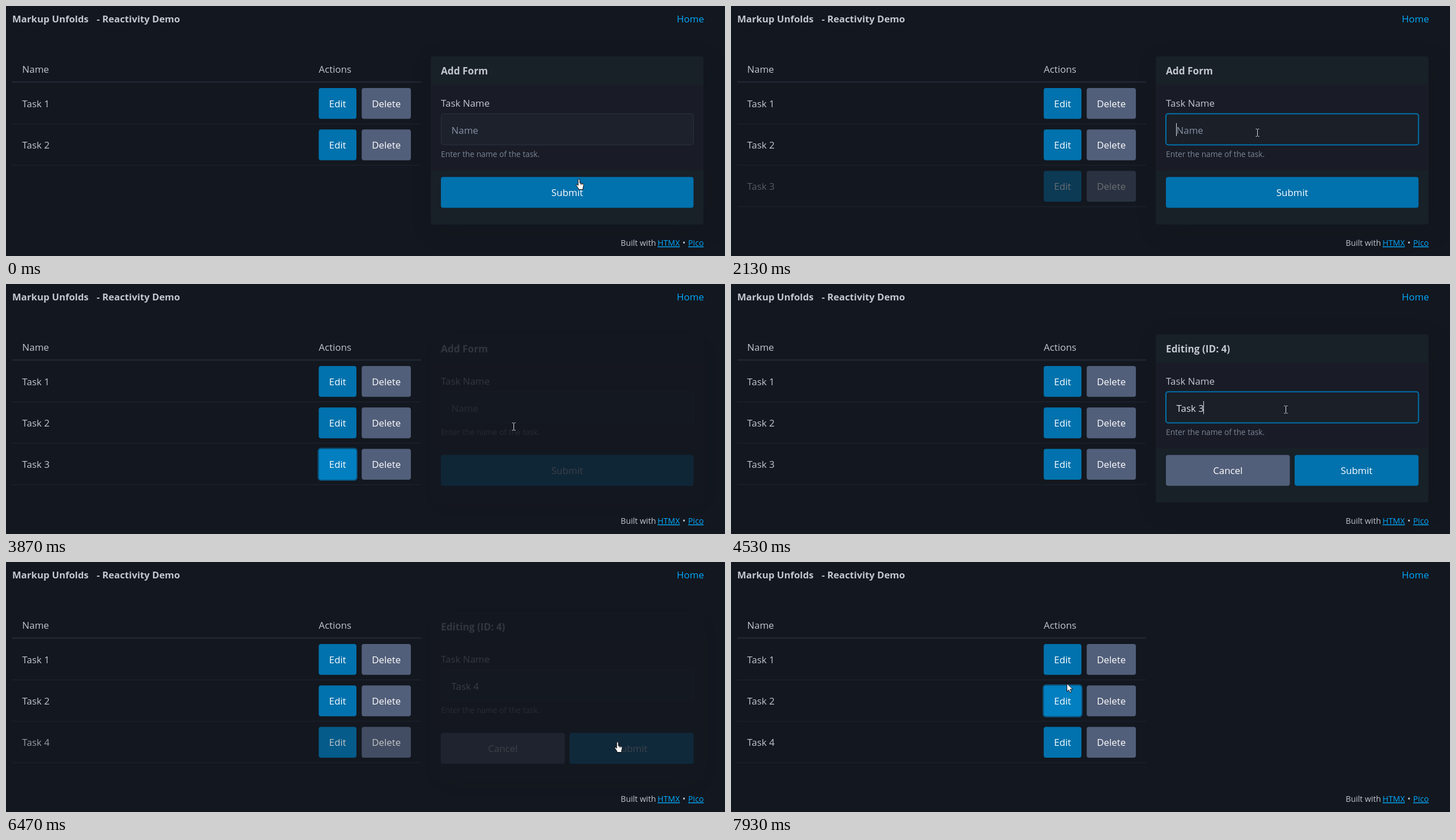
An HTML page for the animation above (8000 ms loop, 1268 by 442 pixels).

```html
<!DOCTYPE html>
<html lang="en">
<head>
<meta charset="utf-8">
<title>Reactivity Demo</title>
<style>
  html, body { margin: 0; width: 100%; height: 100%; overflow: hidden; background: #13171f; }
  svg { display: block; font: 500 16.9px "Open Sans", "Noto Sans", sans-serif; }
  text { fill: #c2c7d0; white-space: pre; }
  .bold { font-weight: 700; font-size: 17.2px; }
  .title { font-weight: 700; font-size: 16.8px; }
  .small { font-weight: 400; font-size: 14.2px; }
  .hint { font-weight: 400; font-size: 13.8px; fill: #7b8495; }
  .link { fill: #01aaff; }
  .line { text-decoration: underline; text-underline-offset: 2px; text-decoration-thickness: 1px; }
  .label { fill: #fff; text-anchor: middle; }
  .value { fill: #e0e3e7; }
  .empty { fill: #8891a4; }
  .shadow { filter: drop-shadow(6px 10px 20px rgba(7, 9, 12, .1)); }
</style>
</head>
<body>
<svg id="stage" width="1268" height="442" viewBox="0 0 1268 442"></svg>
<script>
const LOOP = 8000, FADE = 500;
const BLUE = '#0172ad', BRIGHT = '#017fc0', GREY = '#525f7a';
const stage = document.getElementById('stage');
const pen = document.createElement('canvas').getContext('2d');
pen.font = '500 16.9px "Open Sans", "Noto Sans", sans-serif';

const clamp = v => Math.max(0, Math.min(1, v));
const within = (t, ...spans) => spans.some(([a, b]) => t >= a && t < b);

const text = (x, y, s, cls = '') => `<text x="${x}" y="${y}" class="${cls}">${s}</text>`;
const rect = (x, y, w, h, fill, extra = '') =>
  `<rect x="${x}" y="${y}" width="${w}" height="${h}" fill="${fill}" ${extra}/>`;
const group = (opacity, body) => `<g opacity="${opacity}">${body}</g>`;

function button(x, y, w, s, fill, ring) {
  return (ring ? rect(x - 1, y - 1, w + 2, 56.5, 'none', 'rx="5" stroke="#0c4e75" stroke-width="2"') : '') +
    rect(x, y, w, 54.5, fill, 'rx="4"') + text(x + w / 2, y + 33.5, s, 'label');
}

// Contents of the name field over time
const typed = [
  [0, ''], [870, 'T'], [1200, 'Ta'], [1300, 'Tas'], [1400, 'Task'], [1600, 'Task '], [1730, 'Task 3'],
  [1945, ''], [3955, 'Task 3'], [5070, 'Task '], [5200, 'Task 4'], [6560, '']
];

function row(i, name, t) {
  const y = 145 + 73.2 * i;
  const focused = i === 2 && within(t, [3445, 4430]) || i === 1 && t >= 7430;
  const hot = focused || i === 1 && t >= 7290;
  return text(28.5, y + 33.5, name) +
    button(551.5, y, 66.5, 'Edit', hot ? BRIGHT : BLUE, focused) +
    button(627.3, y, 86.7, 'Delete', GREY);
}

function table(t) {
  const count = t < 1945 ? 2 : 3;
  const names = ['Task 1', 'Task 2', t < 6095 ? 'Task 3' : 'Task 4'];
  const shown = clamp((t - (t < 6095 ? 1945 : 6095)) / FADE);
  let out = text(28.5, 118, 'Name') + text(551.5, 118, 'Actions') + rect(11, 133, 721, 2.7, '#202632');
  for (let i = 0; i < count; i++) {
    out += rect(11, 208 + 73.2 * i, 721, 1, '#202632') + group(i === 2 ? shown : 1, row(i, names[i], t));
  }
  return out;
}

function field(t) {
  const value = typed.filter(([start]) => start <= t).pop()[1];
  const focus = within(t, [470, 3445], [4430, 6045]);
  const caret = within(t, [470, 1000], [1200, 2270], [2770, 3270], [4430, 4930], [5000, 5600]);
  const box = focus
    ? rect(767, 190.5, 445.5, 55, '#1a1f28', `rx="4" stroke="${BLUE}" stroke-width="2"`)
    : rect(767.5, 190.5, 445, 55, '#1c212c', 'rx="4" stroke="#2a3140"');
  return box + text(785.5, 225.5, value || 'Name', value ? 'value' : 'empty') +
    (caret ? rect(Math.round(785 + pen.measureText(value).width), 207, 1, 23, '#e0e3e7') : '');
}

function form(t) {
  const editing = within(t, [3955, 6560]);
  const opacity = Math.max(0, Math.min(1,
    Math.abs(t - 3955) / FADE, Math.abs(t - 6560) / FADE, (7930 - t) / FADE));
  const submit = within(t, [5930, 6560]) ? BRIGHT : BLUE;
  return group(opacity,
    rect(749, 89, 481, 297.5, '#182028', 'rx="4" class="shadow"') +
    rect(749, 139, 481, 152, '#191c26') +
    text(767, 120.5, editing ? 'Editing (ID: 4)' : 'Add Form', 'bold') +
    text(767, 177.5, 'Task Name') + field(t) +
    text(767, 266.5, 'Enter the name of the task.', 'hint') +
    (editing
      ? button(767, 302.3, 218.5, 'Cancel', GREY) + button(994, 302.3, 218.5, 'Submit', submit)
      : button(767, 302.3, 445.5, 'Submit', submit)));
}

// Pointer stops: time, x, y
const path = [
  [0, 1009, 306], [70, 1009, 306], [500, 903, 219], [1800, 903, 219], [2100, 928, 224], [2470, 928, 224],
  [2930, 567, 315], [3040, 567, 315], [3070, 568, 315], [3520, 568, 315], [3870, 895, 252],
  [4150, 978, 222], [5600, 978, 222], [5670, 1008, 243], [5950, 1077, 318], [6600, 1077, 318],
  [7300, 592, 247], [7470, 592, 247], [7900, 592, 215], [8000, 592, 215]
];
const shapes = {
  arrow: '<path d="M0 0v14l3.2-3 2.2 5 2.4-1-2.2-5h4.6z" fill="#fff" stroke="#000" stroke-width=".9"/>',
  beam: '<path d="M-3-6.5h2l1 1 1-1h2M0-5.5v11M-3 6.5h2l1-1 1 1h2" fill="none" stroke="#dde0e4"/>',
  hand: '<path d="M-.5 1q1.5-2 3 0v6l5.5 1.3q1.5.5 1.3 2.2l-1.3 6v2h-8v-2l-4-5.5q-.3-2 2-1.2l1.5 1.5z" ' +
    'fill="#fff" stroke="#000"/><path d="M4.3 7.5v3M6.5 8v2.7" stroke="#000" stroke-width=".8"/>'
};

function pointerKind(x, y) {
  const inside = (l, top, r, b) => x >= l && x <= r && y >= top && y <= b;
  if (inside(767, 190, 1213, 246) || inside(767, 246, 942, 272)) return 'beam';
  const onRow = y >= 145 && (y - 145) % 73.2 < 55 && y < 347;
  if (onRow && (inside(551, 0, 618, 442) || inside(627, 0, 714, 442)) || inside(767, 302, 1213, 357)) return 'hand';
  return 'arrow';
}

function pointer(t) {
  if (within(t, [870, 1800], [4930, 5650])) return '';
  const n = path.findIndex(p => p[0] > t);
  const [t0, x0, y0] = path[n - 1], [t1, x1, y1] = path[n];
  const u = (t - t0) / (t1 - t0), k = u * u * (3 - 2 * u);
  const x = x0 + (x1 - x0) * k, y = y0 + (y1 - y0) * k;
  return `<g transform="translate(${Math.round(x) + .5} ${Math.round(y)})">${shapes[pointerKind(x, y)]}</g>`;
}

const page =
  text(11, 29, 'Markup Unfolds', 'title') + text(160, 29, '- Reactivity Demo', 'title') +
  text(1183, 29, 'Home', 'link') +
  text(1084, 424, 'Built with', 'small') + text(1149, 424, 'HTMX', 'small link line') +
  text(1193, 424, '•', 'small') + text(1203, 424, 'Pico', 'small link line');

const begin = performance.now();
function draw() {
  const t = (performance.now() - begin) % LOOP;
  stage.innerHTML = page + table(t) + form(t) + pointer(t);
  requestAnimationFrame(draw);
}
draw();
</script>
</body>
</html>
```
